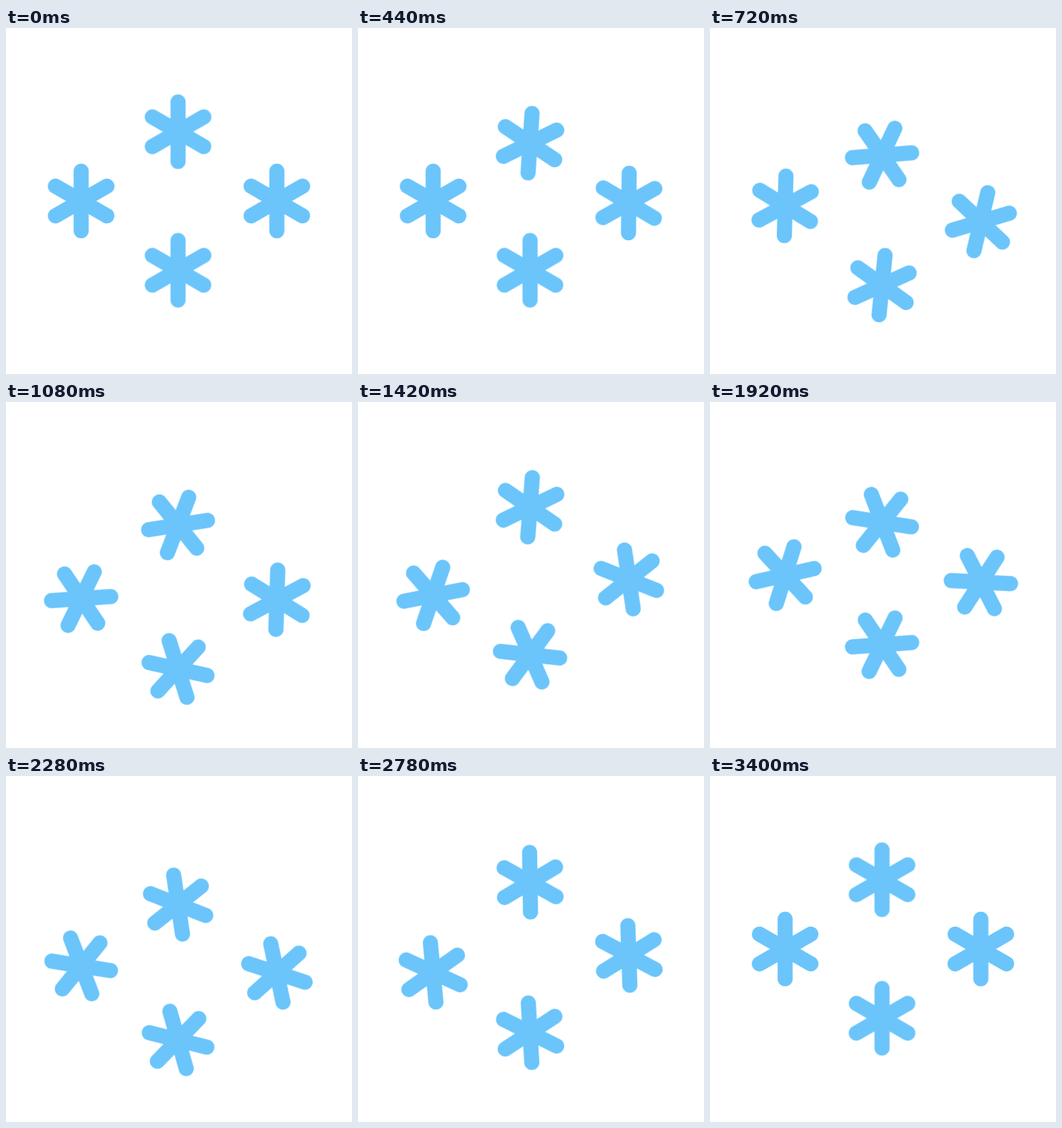
These frames come from a looping animation (512 px wide and 512 px high, 3.6 s). An HTML page without scripts:

```html
<!DOCTYPE html>
<html lang="en">
<head>
<meta charset="utf-8">
<title>Snowflakes</title>
<style>
  html, body { margin: 0; width: 100%; height: 100%; overflow: hidden; background: #fff; }
  svg { display: block; width: 100vw; height: 100vh; }
  .arms { fill: none; stroke: #6bc5fa; stroke-width: 22.4; stroke-linecap: round; }
  .bob, .spin {
    animation: bob 3600ms cubic-bezier(.333, 0, .2, 1) calc(224ms + 118ms * var(--i)) infinite;
  }
  .spin { animation-name: spin; }

  /* two dips per half turn, then a rest */
  @keyframes bob {
    0%, 39.1667%, 78.3333%, 100% { transform: translateY(0); }
    19.5833%, 58.75% { transform: translateY(36.9px); }
  }
  @keyframes spin {
    0% { transform: rotate(0deg); }
    78.3333%, 100% { transform: rotate(180deg); }
  }
</style>
</head>
<body>
<svg viewBox="0 0 512 512">
  <defs>
    <path id="flake" class="arms" d="M0-44V44M-38.1-22L38.1 22M-38.1 22L38.1-22"/>
  </defs>
  <g transform="translate(254.6 153.5)" style="--i:0"><g class="bob"><g class="spin"><use href="#flake"/></g></g></g>
  <g transform="translate(400.8 256)" style="--i:1"><g class="bob"><g class="spin"><use href="#flake"/></g></g></g>
  <g transform="translate(254.6 358.5)" style="--i:2"><g class="bob"><g class="spin"><use href="#flake"/></g></g></g>
  <g transform="translate(111.2 256)" style="--i:3"><g class="bob"><g class="spin"><use href="#flake"/></g></g></g>
</svg>
</body>
</html>
```
